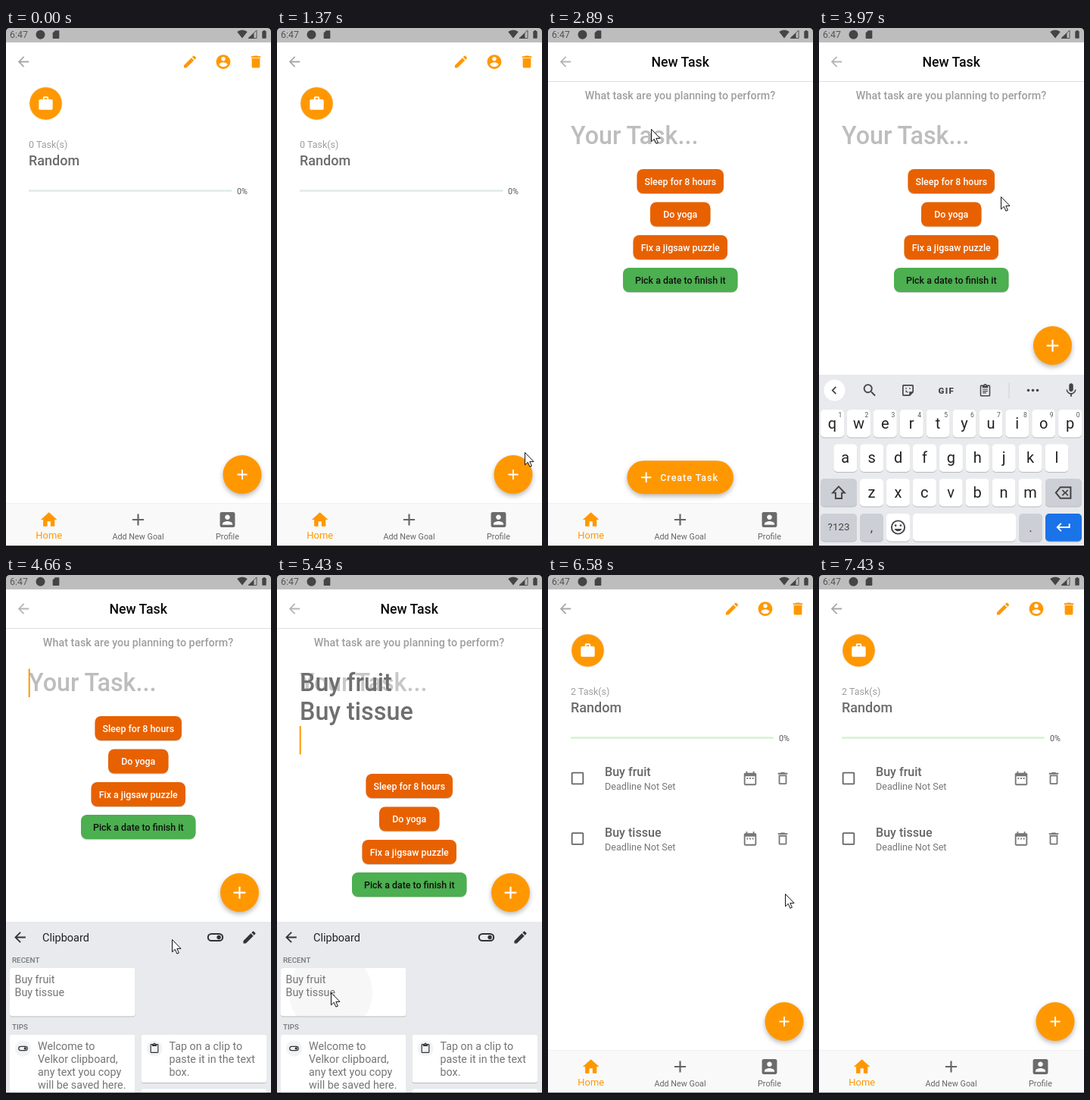
Animation of 350x684 px, one loop 8.27 s. Source, as an HTML page:

```html
<!DOCTYPE html>
<html lang="en">
<head>
<meta charset="utf-8">
<title>Task app</title>
<style>
html, body { margin: 0; width: 100%; height: 100%; overflow: hidden; background: #fff; }
svg { display: block; width: 350px; height: 684px; font-family: Roboto, sans-serif; }
.raised { filter: drop-shadow(0 3px 3px rgba(0, 0, 0, .28)); }
.card { filter: drop-shadow(0 1px .7px rgba(0, 0, 0, .2)); }
</style>
</head>
<body>
<svg id="stage" viewBox="0 0 350 684"></svg>
<script>
const LOOP = 8270;
const ORANGE = '#ff9800', CHIP = '#e86100', GREY = '#6b6b6b', INK = '#444', BOARD = '#e8eaed', KEY = '#cccfd5';

const ICONS = {
  back: 'M20 11H7.83l5.59-5.59L12 4l-8 8 8 8 1.41-1.41L7.83 13H20z',
  edit: 'M3 17.25V21h3.75L17.81 9.94l-3.75-3.75zM20.71 7.04c.39-.39.39-1.02 0-1.41l-2.34-2.34a1 1 0 0 0-1.41 0l-1.83 1.83 3.75 3.75z',
  person: 'M12 2C6.48 2 2 6.48 2 12s4.48 10 10 10 10-4.48 10-10S17.52 2 12 2zm0 3c1.66 0 3 1.34 3 3s-1.34 3-3 3-3-1.34-3-3 1.34-3 3-3zm0 14.2c-2.5 0-4.71-1.28-6-3.22.03-1.99 4-3.08 6-3.08 1.99 0 5.97 1.09 6 3.08-1.29 1.94-3.5 3.22-6 3.22z',
  trash: 'M6 19c0 1.1.9 2 2 2h8c1.1 0 2-.9 2-2V7H6zM19 4h-3.5l-1-1h-5l-1 1H5v2h14z',
  bin: 'M6 19c0 1.1.9 2 2 2h8c1.1 0 2-.9 2-2V7H6zM8 9h8v10H8zm7.5-5l-1-1h-5l-1 1H5v2h14V4z',
  work: 'M20 6h-4V4c0-1.11-.89-2-2-2h-4c-1.11 0-2 .89-2 2v2H4c-1.11 0-2 .89-2 2v11c0 1.11.89 2 2 2h16c1.11 0 2-.89 2-2V8c0-1.11-.89-2-2-2zm-6 0h-4V4h4z',
  home: 'M10 20v-6h4v6h5v-8h3L12 3 2 12h3v8z',
  add: 'M19 13h-6v6h-2v-6H5v-2h6V5h2v6h6z',
  profile: 'M3 5v14c0 1.1.89 2 2 2h14c1.1 0 2-.9 2-2V5c0-1.1-.9-2-2-2H5c-1.11 0-2 .9-2 2zm12 4c0 1.66-1.34 3-3 3s-3-1.34-3-3 1.34-3 3-3 3 1.34 3 3zm-9 8c0-2 4-3.1 6-3.1s6 1.1 6 3.1v1H6z',
  box: 'M19 5v14H5V5h14m0-2H5c-1.1 0-2 .9-2 2v14c0 1.1.9 2 2 2h14c1.1 0 2-.9 2-2V5c0-1.1-.9-2-2-2z',
  date: 'M9 11H7v2h2zm4 0h-2v2h2zm4 0h-2v2h2zm2-7h-1V2h-2v2H8V2H6v2H5c-1.1 0-2 .9-2 2v14c0 1.1.9 2 2 2h14c1.1 0 2-.9 2-2V6c0-1.1-.9-2-2-2zm0 16H5V9h14z',
  wifi: 'M12 21.5L23.64 7c-.45-.34-4.93-4-11.64-4S.81 6.66.36 7z',
  card: 'M18 2h-8L4 8v12c0 1.1.9 2 2 2h12c1.1 0 2-.9 2-2V4c0-1.1-.9-2-2-2z',
  battery: 'M15.7 4H14V2h-4v2H8.3C7.6 4 7 4.6 7 5.3v15.4c0 .7.6 1.3 1.3 1.3h7.4c.7 0 1.3-.6 1.3-1.3V5.3c0-.7-.6-1.3-1.3-1.3z',
  search: 'M15.5 14h-.79l-.28-.27A6.5 6.5 0 1 0 13.73 14.43l.27.28v.79l5 5L20.5 19zm-6 0a4.5 4.5 0 1 1 0-9 4.5 4.5 0 0 1 0 9z',
  mic: 'M12 14c1.66 0 3-1.34 3-3V5c0-1.66-1.34-3-3-3S9 3.34 9 5v6c0 1.66 1.34 3 3 3zm5.3-3c0 3-2.54 5.1-5.3 5.1S6.7 14 6.7 11H5c0 3.41 2.72 6.23 6 6.72V21h2v-3.28c3.28-.48 6-3.3 6-6.72z',
  paste: 'M19 2h-4.18C14.4.84 13.3 0 12 0S9.6.84 9.18 2H5c-1.1 0-2 .9-2 2v16c0 1.1.9 2 2 2h14c1.1 0 2-.9 2-2V4c0-1.1-.9-2-2-2zm-7 0c.55 0 1 .45 1 1s-.45 1-1 1-1-.45-1-1 .45-1 1-1zm7 18H5V4h2v3h10V4h2z',
  notes: 'M7 10h10v1.7H7zm0 3.5h10v1.7H7zm0 3.5h7v1.7H7z',
  smile: 'M12 2a10 10 0 1 0 0 20 10 10 0 0 0 0-20zm0 18a8 8 0 1 1 0-16 8 8 0 0 1 0 16zm3.5-9a1.5 1.5 0 1 0 0-3 1.5 1.5 0 0 0 0 3zm-7 0a1.5 1.5 0 1 0 0-3 1.5 1.5 0 0 0 0 3zm3.5 6.5c2.33 0 4.31-1.46 5.11-3.5H6.89c.8 2.04 2.78 3.5 5.11 3.5z',
  left: 'M15.41 7.41L14 6l-6 6 6 6 1.41-1.41L10.83 12z',
  enter: 'M19 7v4H5.83l3.58-3.59L8 6l-6 6 6 6 1.41-1.41L5.83 13H21V7z',
  toggle: 'M17 6.5H7a5.5 5.5 0 0 0 0 11h10a5.5 5.5 0 0 0 0-11zm0 9H7a3.5 3.5 0 0 1 0-7h10a3.5 3.5 0 0 1 0 7zM16.5 9.3a2.7 2.7 0 1 0 .01 0z',
  shift: 'M12 3L3 12.500h4.500V19h9v-6.500H21zm0 2.500l5 5.300h-2.200v6.500H9.200v-6.500H7z',
  erase: 'M22 4H7.5L1 12l6.5 8H22zm-2 14H8.4l-4.9-6 4.9-6H20zm-9-2l3-3 3 3 1.2-1.2-2.9-2.8 2.9-2.8L17 8l-3 3-3-3-1.2 1.2 2.9 2.8-2.9 2.8z',
  sticker: 'M5 3a2 2 0 0 0-2 2v14a2 2 0 0 0 2 2h10l6-6V5a2 2 0 0 0-2-2zm0 2h14v9h-5v5H5zm3 3v2h2V8zm6 0v2h2V8zm-6 4c0 2.5 2 4 4 4v-1.6c-1.2 0-2.2-1-2.4-2.4z'
};

const rect = (x, y, w, h, fill, r = 0, extra = '') =>
  `<rect x="${x}" y="${y}" width="${w}" height="${h}" rx="${r}" fill="${fill}" ${extra}/>`;
const circle = (x, y, r, fill, extra = '') => `<circle cx="${x}" cy="${y}" r="${r}" fill="${fill}" ${extra}/>`;
const text = (x, y, size, str, fill, weight = 400, extra = '') =>
  `<text x="${x}" y="${y}" font-size="${size}" fill="${fill}" font-weight="${weight}" ${extra}>${str}</text>`;
const centred = (x, y, size, str, fill, weight) => text(x, y, size, str, fill, weight, 'text-anchor="middle"');
const icon = (name, x, y, size, fill) =>
  `<path d="${ICONS[name]}" fill="${fill}" transform="translate(${x - size / 2} ${y - size / 2}) scale(${size / 24})"/>`;
const group = (id, body, extra = '') => `<g id="${id}" ${extra}>${body}</g>`;

const taskRow = (y, name) =>
  icon('box', 39, y, 22, '#666') + text(75, y - 3, 16.1, name, '#666', 500) +
  text(75, y + 15, 12.6, 'Deadline Not Set', '#777') +
  icon('date', 267, y, 22, '#777') + icon('bin', 310, y, 21.5, '#777');

const goalPage =
  icon('back', 23, 44.5, 21.5, '#a8a8a8') + icon('edit', 243, 44.5, 21.5, ORANGE) +
  icon('person', 287, 44.5, 22.5, ORANGE) + icon('trash', 330, 44.5, 21.5, ORANGE) +
  circle(52.5, 99.5, 21.7, ORANGE, 'stroke="#eee" stroke-width=".8"') + icon('work', 52.5, 99.5, 22, '#fff') +
  text(30, 158, 12.5, '', '#9e9e9e', 400, 'id="count"') +
  text(30, 181, 18, 'Random', '#6b6b6b', 500) +
  rect(30, 213.3, 268, 2.4, '#dcebe3', 0, 'id="bar"') + text(305, 218.5, 10.8, '0%', '#555') +
  group('tasks', taskRow(268, 'Buy fruit') + taskRow(347.5, 'Buy tissue'));

const chip = (x, y, w, str, fill, ink) =>
  rect(x, y, w, 32, fill, 8, 'class="card"') + centred(x + w / 2, y + 20.5, 12.4, str, ink, 500);

const taskPage =
  rect(0, 19, 350, 640, '#fff') + icon('back', 23, 44.5, 21.5, '#b5b5b5') +
  centred(174.7, 51.3, 17.7, 'New Task', '#0a0a0a', 500) + rect(0, 70, 350, 1, '#dedede') +
  centred(174.5, 94, 14.3, 'What task are you planning to perform?', '#9e9e9e', 500) +
  text(30, 153, 32.3, 'Your Task...', '#bdbdbd', 500, 'id="hint"') +
  group('typed', text(30, 153, 32.3, 'Buy fruit', '#6f6f6f', 500) + text(30, 191, 32.3, 'Buy tissue', '#6f6f6f', 500)) +
  rect(29.7, 123.5, 2, 37.5, ORANGE, 0, 'id="caret"') +
  group('chips',
    chip(117.5, 186, 114.5, 'Sleep for 8 hours', CHIP, '#fff') +
    chip(135, 229.5, 79.5, 'Do yoga', CHIP, '#fff') +
    chip(112.5, 273, 124.5, 'Fix a jigsaw puzzle', CHIP, '#fff') +
    chip(99, 316, 151.5, 'Pick a date to finish it', '#4caf50', '#101010'));

const navBar =
  rect(0, 626.5, 350, 57.5, '#f9f9f9') + rect(0, 626, 350, 1, '#f1f1f1') +
  icon('home', 56.7, 648, 26, ORANGE) + centred(56.7, 673, 12.9, 'Home', ORANGE) +
  icon('add', 174.5, 648, 26, '#666') + centred(174.5, 674, 10.8, 'Add New Goal', '#666') +
  icon('profile', 292.5, 648, 26.5, GREY) + centred(292.5, 674, 10.8, 'Profile', '#666');

const fab =
  rect(0, 0, 51, 51, ORANGE, 25, 'id="fabBody" class="raised"') +
  `<path id="fabPlus" d="${ICONS.add}" fill="#fff"/>` +
  text(0, 597, 12.5, 'Create Task', '#fff', 500, 'id="fabLabel" letter-spacing="1"');

const key = (x, y, w, label = '', fill = '#fff', size = 20, ink = '#222') =>
  rect(x, y, w, 36.5, fill, 5, 'class="card"') + centred(x + w / 2, y + 18.2 + size * .32, size, label, ink);
const keyRow = (letters, x, y) => [...letters].map((c, i) => key(x + i * 34.9, y, 31, c)).join('');

const keyboard =
  rect(0, 457, 350, 227, BOARD) + circle(20.5, 477.5, 14, '#fff') + icon('left', 20, 477.5, 21, INK) +
  icon('search', 67, 477.5, 22, INK) + icon('sticker', 117.5, 477.5, 20, INK) +
  text(157.5, 481.7, 11.5, 'GIF', INK, 900, 'letter-spacing="1.3"') +
  icon('paste', 219.5, 478, 18, INK) + icon('notes', 219.5, 477, 16, INK) + rect(250.5, 468, 1, 20, '#d0d3d7') +
  [276.5, 282.5, 288.5].map(x => circle(x, 477.5, 1.8, INK)).join('') + icon('mic', 333, 477.5, 22, INK) +
  keyRow('qwertyuiop', 2, 503) +
  [...'1234567890'].map((c, i) => centred(28 + i * 34.9, 513, 8.5, c, '#555')).join('') +
  keyRow('asdfghjkl', 19.3, 548.5) +
  key(2, 594, 48, '', KEY) + icon('shift', 26, 613, 27, INK) +
  keyRow('zxcvbnm', 54, 594) + key(299, 594, 48, '', KEY) + icon('erase', 323, 612.5, 25, INK) +
  key(2, 640, 48, '?123', KEY, 13.4, INK) + key(54, 640, 31, ',', KEY, 17, INK) +
  key(89, 640, 31) + icon('smile', 104.5, 658, 23, INK) + key(124, 640, 136) +
  key(264, 640, 31, '.', KEY, 17, INK) + key(299, 640, 48, '', '#1a73e8') + icon('enter', 323, 658, 23, '#fff');

const tipCard = (x, y, h, name, lines) =>
  rect(x, y, 165.5, h, '#fff', 3, 'class="card"') +
  (name ? circle(x + 17.5, y + 18, 10.5, '#f1f3f4') + icon(name, x + 17.5, y + 18, 14.5, '#333') : '') +
  lines.map((s, i) => text(x + 37, y + 20 + i * 17.1, 14.3, s, '#757575')).join('');

const clipboard =
  rect(0, 457, 350, 227, BOARD) + icon('back', 18.5, 477.5, 22, '#333') +
  text(48, 483, 14.5, 'Clipboard', '#222') + icon('toggle', 276.5, 477.5, 24.5, '#333') + icon('edit', 321.5, 477.5, 21.5, '#333') +
  text(8, 511, 9.8, 'RECENT', '#777', 500) + text(8, 599, 9.8, 'TIPS', '#777', 500) +
  rect(5, 518, 165.5, 63.5, '#fff', 3, 'class="card"') +
  circle(71, 550, 10, '#888', 'id="ripple" clip-path="url(#clip)"') +
  text(11.5, 538, 14.3, 'Buy fruit', '#757575') + text(11.5, 555, 14.3, 'Buy tissue', '#757575') +
  tipCard(5, 606, 90, 'toggle', ['Welcome to', 'Velkor clipboard,', 'any text you copy', 'will be saved here.']) +
  tipCard(178.5, 606, 63, 'paste', ['Tap on a clip to', 'paste it in the text', 'box.']) + tipCard(178.5, 677.5, 20, '', []);

const statusBar =
  rect(0, 0, 350, 19, '#bdbdbd') + text(5, 13.2, 12.4, '6:47', '#555') +
  circle(45.5, 8.8, 6, '#444') + icon('card', 66, 8.6, 13, '#444') +
  icon('wifi', 312, 8, 14, '#444') +
  '<path d="M331 3v10.500h-11z" fill="none" stroke="#555"/><path d="M327.500 6.500v7h-7.500z" fill="#444"/>' +
  icon('battery', 341, 8.3, 13, '#444');

const bezel = rect(0, 682.3, 350, 1.7, '#0a0a0a') + '<path d="M0 0h5q-5 0-5 5zM350 0h-5q5 0 5 5z" fill="#000"/>';
const pointer = '<path d="M.5 .5v16.300l3.800-3.500 2.600 5.900 2.500-1.100-2.600-5.700h5.200z" fill="#fff" stroke="#111" stroke-linejoin="round"/>';

const stage = document.getElementById('stage');
stage.innerHTML =
  '<defs><clipPath id="clip">' + rect(5, 518, 165.5, 63.5, '#000', 3) + '</clipPath></defs>' +
  rect(0, 0, 350, 684, '#fff') + goalPage + group('taskPage', taskPage) + navBar + fab +
  group('board', keyboard + group('panel', clipboard)) + statusBar + bezel + group('pointer', pointer);

const el = {};
stage.querySelectorAll('[id]').forEach(node => el[node.id] = node);
const set = (id, attrs) => Object.entries(attrs).forEach(([k, v]) => el[id].setAttribute(k, v));
const show = (id, on) => set(id, { opacity: +on });

const ramp = (t, from, to) => Math.min(1, Math.max(0, (t - from) / (to - from)));
const smooth = p => p * p * (3 - 2 * p);
const ease = (t, from, to) => smooth(ramp(t, from, to));
const mix = (a, b, p) => a + (b - a) * p;

// Pointer stops: time, x, y
const STOPS = [
  [830, 352, 545], [1370, 327, 559], [1600, 313, 578], [1750, 311, 585], [2300, 311, 585],
  [2740, 140, 126], [2890, 136, 133], [3320, 136, 133], [3430, 240, 222], [3990, 240, 222],
  [4330, 219, 480], [4950, 219, 480], [5300, 71, 550], [5730, 71, 550], [5960, 255, 445],
  [6110, 313, 420], [6840, 313, 420], [7430, 352, 201]
];
function pointerAt(t) {
  const i = STOPS.findIndex(s => s[0] > t);
  if (i < 1) return [400, 0];
  const [a, b] = [STOPS[i - 1], STOPS[i]];
  const p = ease(t, a[0], b[0]);
  return [mix(a[1], b[1], p), mix(a[2], b[2], p)];
}

// Button poses: centre x, centre y, width, height, plus x, plus size
const ROUND = [312, 588.5, 51, 51, 312, 22.5];
const PILL = [174.7, 592.2, 140.5, 44, 129.7, 23];
const RAISED = [308.5, 418.5, 51, 51, 308.5, 27];
const blend = (a, b, p) => a.map((v, i) => mix(v, b[i], p));

function drawFab(t, opened, closed) {
  const lifted = ease(t, 3620, 3850);
  let pose = blend(blend(ROUND, PILL, opened), RAISED, lifted);
  pose = blend(pose, ROUND, closed);
  const [x, y, w, h, plusX, size] = pose;
  set('fabBody', { x: x - w / 2, y: y - h / 2, width: w, height: h, rx: h / 2 });
  set('fabPlus', { transform: `translate(${plusX - size / 2} ${y - size / 2}) scale(${size / 24})` });
  set('fabLabel', { x: x - 26.5, y: y + 4.6, opacity: ramp(opened, .6, 1) * (1 - ramp(lifted, 0, .3)) });
}

function draw(t) {
  const opened = ease(t, 1980, 2280), closed = ease(t, 6250, 6550);
  const page = opened * (1 - closed);
  set('taskPage', { opacity: page, transform: `translate(0 ${150 * (1 - page)})` });
  drawFab(t, opened, closed);

  const done = t >= 6250;
  el.count.textContent = (done ? 2 : 0) + ' Task(s)';
  set('bar', { fill: done ? '#d4f2d0' : '#dcebe3' });
  show('tasks', done);

  const pasted = t >= 5380;
  show('typed', pasted);
  set('hint', { opacity: 1 - ramp(t, 5400, 5600) });
  const blinkOn = t >= 3430 && Math.floor((t - 3430) / 500) % 2 === 0;
  set('caret', { opacity: +(blinkOn && !done), y: pasted ? 199 : 123.5 });
  set('chips', { transform: `translate(0 ${pasted ? 76 : 0})` });

  const up = ease(t, 3600, 3850) * (1 - ease(t, 6230, 6450));
  set('board', { transform: `translate(0 ${230 * (1 - up)})` });
  set('panel', { opacity: ramp(t, 4400, 4540) });
  set('ripple', { r: mix(8, 55, ramp(t, 5300, 5430)), opacity: t < 5300 ? 0 : .07 * (1 - ramp(t, 5480, 5720)) });

  set('pointer', { transform: `translate(${pointerAt(t)})` });
}

const start = performance.now();
function tick() {
  draw((performance.now() - start) % LOOP);
  requestAnimationFrame(tick);
}
tick();
</script>
</body>
</html>
```
